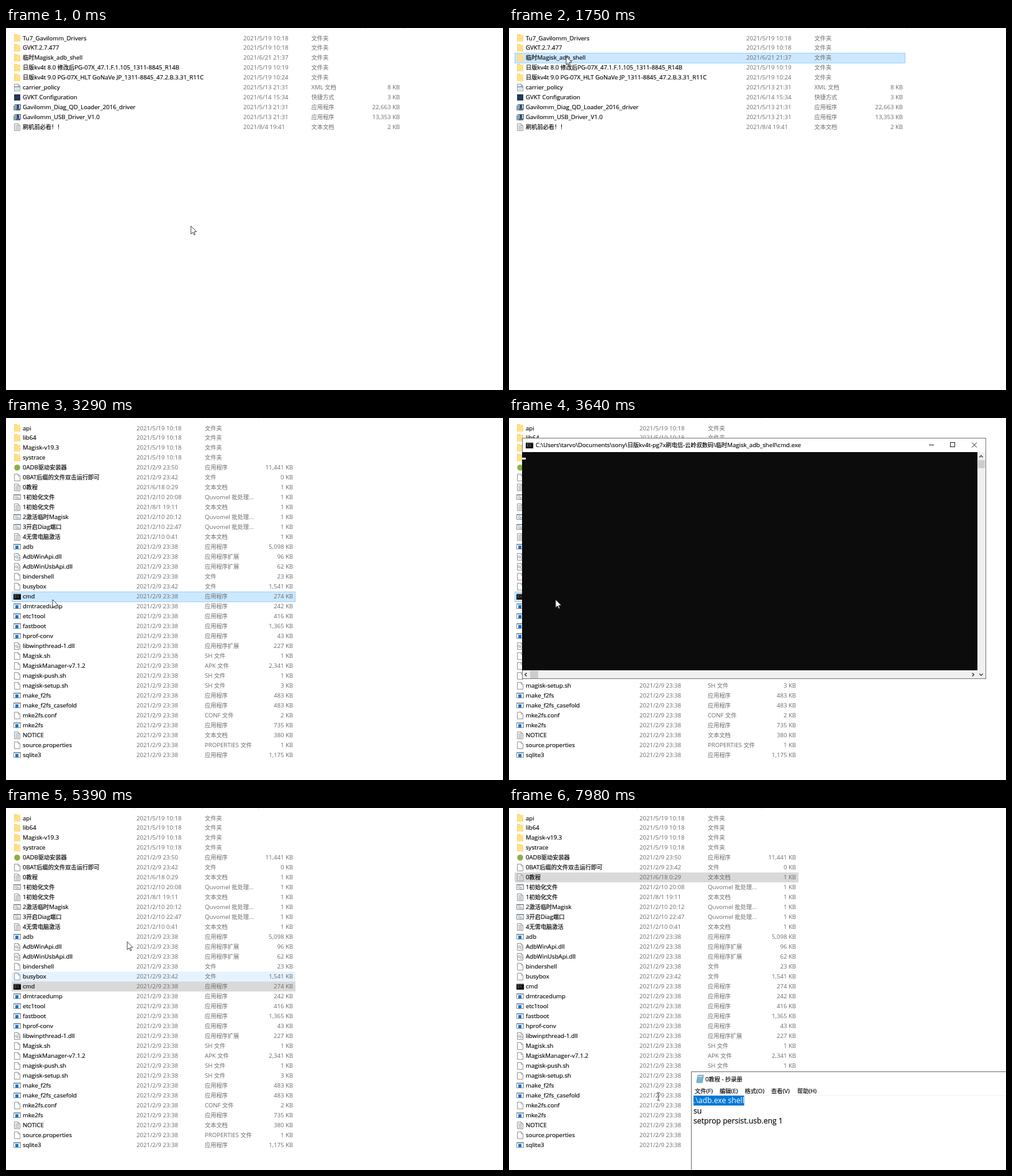
Write an HTML page with a canvas that moves like this. It is 800 px wide and 584 px high and loops after 8000 ms.

```html
<!DOCTYPE html>
<html lang="zh-CN">
<head>
<meta charset="utf-8">
<title>File list</title>
<style>
html, body { margin: 0; width: 100%; height: 100%; overflow: hidden; background: #fff; }
canvas { display: block; }
</style>
</head>
<body>
<canvas id="stage" width="800" height="584"></canvas>
<script>
const ctx = document.getElementById('stage').getContext('2d');
const LOOP = 8000, TICK = 70, STEP = 15.985;
const INK = '#000', GREY = '#6b6b6b';

// Moments at which something switches, in ms
const T = {
  pick: 1500, enter: 1890, pickCmd: 3220, cmdOpen: 3430, cmdClose: 4410,
  pickDoc: 5740, busy: 6090, noteOpen: 6300, loaded: 6510, drag: 7350
};

const parse = s => s.trim().split('\n').map(r => r.split('|'));

const home = {
  date: 382, type: 491.5, size: 634, right: 638, ticks: [578, 640],
  rows: parse(`
folder|Tu7_Gavilomm_Drivers|2021/5/19 10:18|文件夹|
folder|GVKT.2.7.477|2021/5/19 10:18|文件夹|
folder|临时Magisk_adb_shell|2021/6/21 21:37|文件夹|
folder|日版kv4t 8.0 修改后PG-07X_47.1.F.1.105_1311-8845_R14B|2021/5/19 10:19|文件夹|
folder|日版kv4t 9.0 PG-07X_HLT GoNaVe JP_1311-8845_47.2.B.3.31_R11C|2021/5/19 10:24|文件夹|
xml|carrier_policy|2021/5/13 21:31|XML 文档|8 KB
link|GVKT Configuration|2021/6/14 15:34|快捷方式|3 KB
setup|Gavilomm_Diag_QD_Loader_2016_driver|2021/5/13 21:31|应用程序|22,663 KB
setup|Gavilomm_USB_Driver_V1.0|2021/5/13 21:31|应用程序|13,353 KB
text|刷机前必看！！|2021/8/4 19:41|文本文档|2 KB`)
};

const tools = {
  date: 210, type: 320, size: 462, right: 466, ticks: [206, 316, 406],
  rows: parse(`
folder|api|2021/5/19 10:18|文件夹|
folder|lib64|2021/5/19 10:18|文件夹|
folder|Magisk-v19.3|2021/5/19 10:18|文件夹|
folder|systrace|2021/5/19 10:18|文件夹|
droid|0ADB驱动安装器|2021/2/9 23:50|应用程序|11,441 KB
page|0BAT后缀的文件双击运行即可|2021/2/9 23:42|文件|0 KB
text|0教程|2021/6/18 0:29|文本文档|1 KB
bat|1初始化文件|2021/2/10 20:08|Quvomel 批处理...|1 KB
text|1初始化文件|2021/8/1 19:11|文本文档|1 KB
bat|2激活临时Magisk|2021/2/10 20:12|Quvomel 批处理...|1 KB
bat|3开启Diag端口|2021/2/10 22:47|Quvomel 批处理...|1 KB
text|4无需电脑激活|2021/2/10 0:41|文本文档|1 KB
exe|adb|2021/2/9 23:38|应用程序|5,098 KB
dll|AdbWinApi.dll|2021/2/9 23:38|应用程序扩展|96 KB
dll|AdbWinUsbApi.dll|2021/2/9 23:38|应用程序扩展|62 KB
page|bindershell|2021/2/9 23:38|文件|23 KB
page|busybox|2021/2/9 23:42|文件|1,541 KB
cmd|cmd|2021/2/9 23:38|应用程序|274 KB
exe|dmtracedump|2021/2/9 23:38|应用程序|242 KB
exe|etc1tool|2021/2/9 23:38|应用程序|416 KB
exe|fastboot|2021/2/9 23:38|应用程序|1,365 KB
exe|hprof-conv|2021/2/9 23:38|应用程序|43 KB
dll|libwinpthread-1.dll|2021/2/9 23:38|应用程序扩展|227 KB
page|Magisk.sh|2021/2/9 23:38|SH 文件|1 KB
page|MagiskManager-v7.1.2|2021/2/9 23:38|APK 文件|2,341 KB
page|magisk-push.sh|2021/2/9 23:38|SH 文件|1 KB
page|magisk-setup.sh|2021/2/9 23:38|SH 文件|3 KB
exe|make_f2fs|2021/2/9 23:38|应用程序|483 KB
exe|make_f2fs_casefold|2021/2/9 23:38|应用程序|483 KB
page|mke2fs.conf|2021/2/9 23:38|CONF 文件|2 KB
exe|mke2fs|2021/2/9 23:38|应用程序|735 KB
text|NOTICE|2021/2/9 23:38|文本文档|380 KB
page|source.properties|2021/2/9 23:38|PROPERTIES 文件|1 KB
exe|sqlite3|2021/2/9 23:38|应用程序|1,175 KB`)
};

// Pointer path: time, x, y
const path = [
  [0, 297.7, 319.4], [350, 255, 255], [700, 150, 120], [840, 112, 80], [980, 95, 44],
  [1260, 92, 46], [2100, 92, 46], [2450, 130, 48.5], [2590, 135, 48.5], [3150, 76, 290],
  [3290, 75, 293], [3990, 75, 293], [4340, 747, 42], [4410, 747, 42], [4620, 603.5, 505.5],
  [4830, 545, 460], [5600, 64, 124], [5740, 58, 113], [6440, 58, 113], [6720, 120, 190],
  [7280, 385, 466], [7350, 385, 466], [7980, 240, 465]
];

function pointer(t) {
  let i = 1;
  while (i < path.length - 1 && path[i][0] < t) i++;
  const [t0, x0, y0] = path[i - 1], [t1, x1, y1] = path[i];
  const k = Math.max(0, Math.min(1, (t - t0) / (t1 - t0)));
  return { x: x0 + (x1 - x0) * k, y: y0 + (y1 - y0) * k };
}

function box(x, y, w, h, fill, line) {
  if (fill) { ctx.fillStyle = fill; ctx.fillRect(x, y, w, h); }
  if (line) {
    ctx.strokeStyle = line;
    ctx.lineWidth = 1;
    ctx.strokeRect(x + .5, y + .5, w - 1, h - 1);
  }
}

function poly(pts, fill, line, width = 1) {
  ctx.beginPath();
  pts.forEach(([x, y], i) => i ? ctx.lineTo(x, y) : ctx.moveTo(x, y));
  if (fill) { ctx.closePath(); ctx.fillStyle = fill; ctx.fill(); }
  if (line) { ctx.strokeStyle = line; ctx.lineWidth = width; ctx.stroke(); }
}

function ring(x, y, r, line, width, from = 0, to = 7) {
  ctx.beginPath();
  ctx.arc(x, y, r, from, to);
  ctx.strokeStyle = line;
  ctx.lineWidth = width;
  ctx.stroke();
}

function disc(x, y, r, fill) {
  ctx.beginPath();
  ctx.arc(x, y, r, 0, 7);
  ctx.fillStyle = fill;
  ctx.fill();
}

// Latin and Chinese runs are set in their own fonts
const runs = s => s.match(/[\u3000-\u9fff\uff00-\uffef]+|[^\u3000-\u9fff\uff00-\uffef]+/g) || [];

function setFont(run, size) {
  ctx.font = run.charCodeAt(0) >= 0x3000
    ? size * .958 + 'px "Noto Sans CJK SC", "Noto Sans CJK", sans-serif'
    : size + 'px "Open Sans", "Noto Sans", sans-serif';
}

function widthOf(s, size = 9.62) {
  return runs(s).reduce((w, r) => (setFont(r, size), w + ctx.measureText(r).width), 0);
}

function text(s, x, y, color = INK, size = 9.62) {
  for (const r of runs(s)) {
    setFont(r, size);
    ctx.fillStyle = color;
    ctx.fillText(r, x, y + size * .365);
    if (color === INK) {
      // A hairline gives black text its firmer weight
      ctx.strokeStyle = color;
      ctx.lineWidth = .15;
      ctx.strokeText(r, x, y + size * .365);
    }
    x += ctx.measureText(r).width;
  }
}

function page(y) {
  poly([[13.5, y - 5.5], [19.5, y - 5.5], [22.5, y - 2.5], [22.5, y + 5.5], [13.5, y + 5.5], [13.5, y - 5.5]], '#fff', '#8c8c8c', .9);
  poly([[19.5, y - 5.5], [19.5, y - 2.5], [22.5, y - 2.5]], null, '#8c8c8c', .8);
}

function frame(y) {
  box(12, y - 5, 12, 9, '#fff', '#85919b');
  box(12, y - 5, 12, 2, '#8d9aa5');
}

function gears(y) {
  ring(16.5, y, 1.7, '#929aa0', 1);
  ring(19.7, y + 1.5, 1.7, '#929aa0', 1);
}

const icons = {
  folder(y) {
    box(13, y - 6, 5, 3, '#f6cf66');
    box(13, y - 5, 10, 11, '#ffe08a');
    box(13, y - 5, 1, 11, '#f8d470');
    box(22, y + 1, 1, 5, '#f9d676');
  },
  page,
  text(y) {
    page(y);
    for (let i = -3; i < 5; i += 2) box(15, y + i, 6, 1, '#a2a2a2');
  },
  xml(y) {
    page(y);
    box(14, y - 2, 8, 2, '#7fa5d2');
    box(15, y + 2, 6, 1, '#8eb1d9');
  },
  link(y) { box(13, y - 5, 10, 10, '#24385a'); },
  setup(y) {
    box(14, y - 5, 10, 8, '#c3d2dc', '#56697a');
    box(12, y - 3, 4, 8, '#7fa3a8');
    box(17, y - 4, 4, 6, '#2c4d80');
    box(16, y + 3, 7, 2, '#667');
  },
  droid(y) { disc(18, y, 4.8, '#8fae45'); },
  bat(y) { frame(y); gears(y); },
  dll(y) { page(y); gears(y); },
  exe(y) { frame(y); box(15, y - 2, 5, 5, '#1874cd'); },
  cmd(y) { cmdIcon(12, y - 5); }
};

function cmdIcon(x, y) {
  box(x, y, 12, 10, '#080808');
  box(x, y, 12, 1.5, '#a8a8a8');
  text('C:\\', x + 1.5, y + 5, '#fff', 5.5);
}

function drawList(list, chosen, active, hover) {
  list.ticks.forEach(x => box(x, 0, 1, 2, '#e3e3e3'));
  list.rows.forEach(([icon, name, date, type, size], i) => {
    const y = 16 + i * STEP, top = Math.round(y - 8), w = list.right - 9;
    if (i === chosen) {
      if (active) box(9, top, w, 17, '#cce8ff', '#99d1ff');
      else box(9, top, w, 16, '#d9d9d9');
    } else if (i === hover) box(9, top, w, 16, '#e5f3ff');
    icons[icon](Math.round(y));
    text(name, 27, y);
    text(date, list.date, y, GREY);
    text(type, list.type, y, GREY);
    text(size, list.size - widthOf(size), y, GREY);
  });
}

function chevron(x, y, dx, dy) {
  const a = 2.6, b = 1.5;
  poly([[x - dx * b - dy * a, y - dy * b - dx * a], [x + dx * b, y + dy * b],
    [x - dx * b + dy * a, y - dy * b + dx * a]], null, '#444', 1.4);
}

function drawConsole() {
  box(21, 32, 747, 389, '#fff', '#777');
  cmdIcon(27, 39);
  text('C:\\Users\\tarvo\\Documents\\sony\\日版kv4t-pg7x刷电信-云岭叔数码\\临时Magisk_adb_shell\\cmd.exe', 43, 43.5);
  box(676, 43, 8, 1, '#222');
  box(710, 39, 8, 8, null, '#222');
  poly([[745, 39.5], [753, 47.5]], null, '#222');
  poly([[753, 39.5], [745, 47.5]], null, '#222');
  box(22, 55, 745, 365, '#f0f0f0');
  box(21, 55, 733, 352, '#0c0c0c');
  box(755, 68, 11, 13, '#cdcdcd');
  box(34, 408, 13, 12, '#cdcdcd');
  chevron(760, 62, 0, -1);
  chevron(760, 414, 0, 1);
  chevron(27, 414, -1, 0);
  chevron(747, 414, 1, 0);
  box(21, 64, 6, 3, '#fff');
}

function drawNote(t, x) {
  const loaded = t >= T.loaded;
  box(293, 425, 520, 180, '#fff', '#6c6c6c');
  poly([[304, 431], [313, 431], [311, 443], [302, 443]], '#74b8d8', '#5b8197', .8);
  poly([[304, 433], [312, 433]], null, '#dceef7', 1.4);
  text((loaded ? '0教程' : '无标题') + ' - 抄录册', 316, 437);
  const menu = { '文件(F)': 299, '编辑(E)': 339, '格式(O)': 379.5, '查看(V)': 422, '帮助(H)': 464 };
  for (const label in menu) text(label, menu[label], 456);
  box(294, 463, 506, 1, '#f3f3f3');
  if (!loaded) return;

  const size = 12.2, left = 297, line = '.\\adb.exe shell';
  text(line, left, 472, INK, size);
  text('su', left, 488.5, INK, size);
  text('setprop persist.usb.eng 1', left, 505, INK, size);
  if (t <= T.drag) return;

  let n = line.length;
  while (n > 0 && left + widthOf(line.slice(0, n), size) > x + 3) n--;
  const from = left + widthOf(line.slice(0, n), size);
  const to = left + widthOf(line, size);
  ctx.save();
  ctx.beginPath();
  ctx.rect(from, 464, to - from, 16);
  ctx.clip();
  box(from, 464, to - from, 16, '#0078d7');
  text(line, left, 472, '#fff', size);
  ctx.restore();
}

function drawPointer(t, { x, y }) {
  if (t >= T.drag || (t > T.loaded && x > 294 && y > 463)) {
    box(x, y - 5, 1, 11, '#555');
    box(x - 2, y - 6, 5, 1, '#555');
    box(x - 2, y + 6, 5, 1, '#555');
    return;
  }
  const shape = [[0, 0], [0, 13], [3, 10.2], [5, 14.6], [6.8, 13.8], [4.9, 9.5], [9, 9.2], [0, 0]];
  poly(shape.map(([a, b]) => [x + a, y + b]), '#fff', '#333', .9);
  if (t >= T.busy && t < T.loaded) {
    ring(x + 10, y + 1, 4.5, '#2f93d8', 3);
    ring(x + 10, y + 1, 4.5, '#8fd0f5', 2, t / 150, t / 150 + 1.6);
  }
}

// The row highlight trails the pointer slightly
function hoverRow(t, list) {
  if ((t >= T.cmdOpen && t < T.cmdClose + 210) || t > 7200) return -1;
  const p = pointer(t - 140);
  if (p.x > list.right || (t >= T.noteOpen && p.x > 293 && p.y > 425)) return -1;
  return Math.floor((p.y - 8) / STEP);
}

function draw(t) {
  box(0, 0, 800, 584, '#fff');
  const list = t < T.enter ? home : tools;
  let chosen = -1, active = true;
  if (t < T.enter) chosen = t >= T.pick ? 2 : -1;
  else if (t >= T.pickDoc) { chosen = 6; active = t < T.loaded; }
  else if (t >= T.pickCmd) { chosen = 17; active = t < 3990; }
  drawList(list, chosen, active, hoverRow(t, list));

  const p = pointer(t);
  if (t >= T.cmdOpen && t < T.cmdClose) drawConsole();
  if (t >= T.noteOpen) drawNote(t, p.x);
  drawPointer(t, p);
}

const start = performance.now();
function tick(now) {
  const t = Math.max(0, now - start) % LOOP;
  draw(Math.floor(t / TICK) * TICK);
  requestAnimationFrame(tick);
}
draw(0);
requestAnimationFrame(tick);
</script>
</body>
</html>
```
